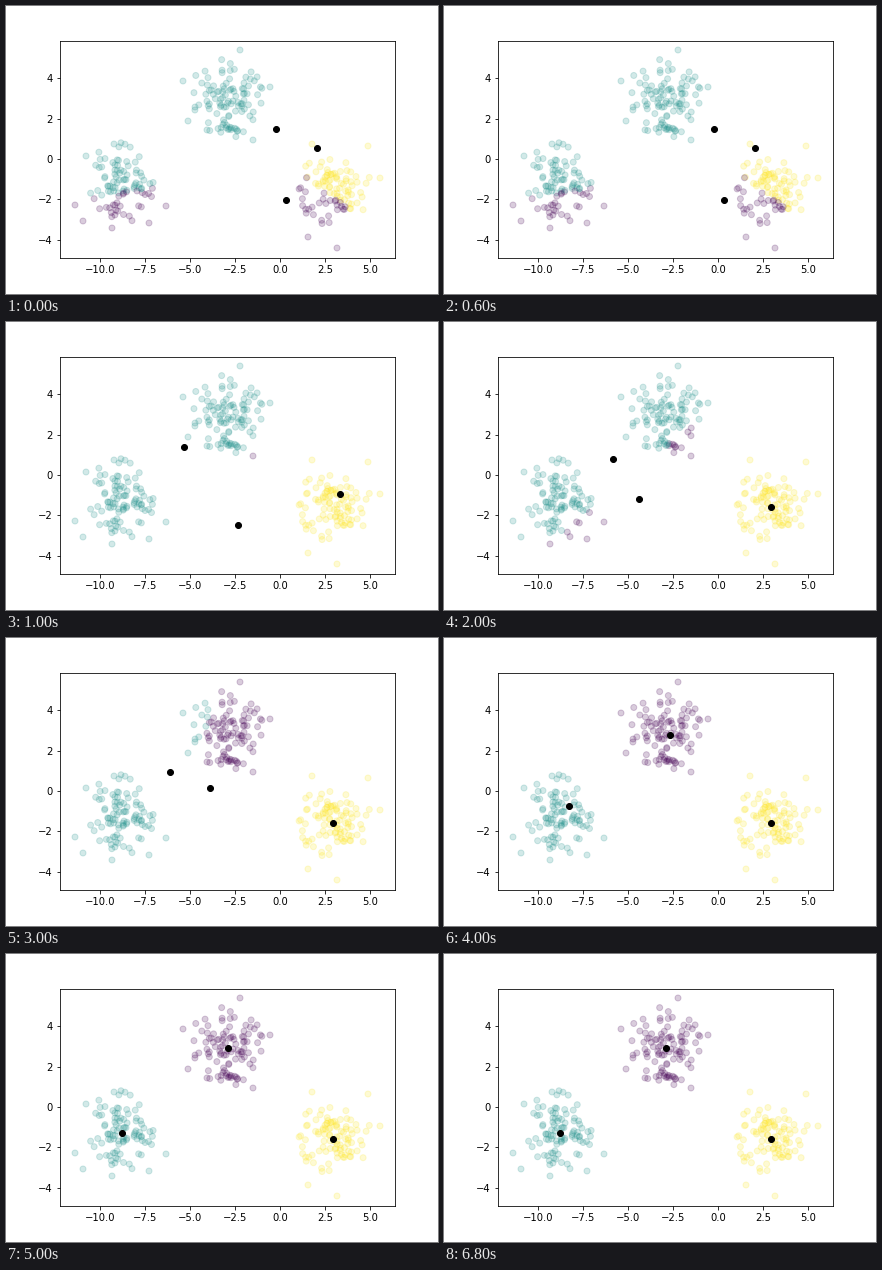
A matplotlib script that plays this animation: 432 px wide and 288 px high, repeating every 8000 ms.

```python
import numpy as np
import matplotlib.pyplot as plt
from matplotlib.animation import FuncAnimation

W, H, DPI = 432, 288, 72
COLORS = np.array(["#440154", "#21918c", "#fde725"])  # purple, teal, yellow
PER_BLOB = 100

# Axes box and data origin/scale in stage pixels (y down)
LEFT, RIGHT, TOP, BOTTOM = 54, 389.2, 34.56, 252.2
ORIGIN = np.array([274.3, 153.0])
SCALE = np.array([18.04, -20.22])


def to_data(px):
    return (np.asarray(px, float) - ORIGIN) / SCALE


# Centre of each blob and the stray points around it
BLOBS = [
    ((116, 178), [(69, 199), (77, 215), (160, 200), (143, 217), (106, 222),
                  (80, 150), (108, 138)]),
    ((222, 93), [(234, 44), (177, 75), (264, 81), (247, 134), (182, 115)]),
    ((327, 184), [(331, 242), (302, 231), (374, 172), (362, 140), (306, 138)]),
]
KNOT = (228, 124)  # tight group at the foot of the middle blob

# Path of each centroid; the last place is held
PATHS = [
    [(280, 193), (232, 202), (195, 176), (204, 149), (226, 96), (222, 93)],
    [(270, 122), (178, 124), (169, 136), (164, 133), (125, 167), (116, 178)],
    [(311, 141), (334, 171), (327, 184)],
]


def cloud(rng, n, sd=1.05, cut=2.05):
    """Centred normal cloud without far strays."""
    pts = rng.normal(0, sd, (5 * n, 2))
    pts = pts[np.hypot(*pts.T) < cut][:n]
    return pts - pts.mean(axis=0)


def make_points():
    rng = np.random.RandomState(4)
    parts = [to_data(KNOT) + cloud(rng, 8, 0.25, 0.4)]
    for home, strays in BLOBS:
        parts.append(to_data(strays))
        parts.append(to_data(home) + cloud(rng, PER_BLOB - len(strays)))
    return rng.permutation(np.vstack(parts))


def centroids(step):
    places = [path[min(step, len(path) - 1)] for path in PATHS]
    return to_data(np.array(places) + (0.5, 0.8))


def nearest(pts, centers):
    return np.linalg.norm(pts[:, None] - centers, axis=2).argmin(axis=1)


points = make_points()

plt.rcParams["font.family"] = "DejaVu Sans"
fig, ax = plt.subplots(figsize=(W / DPI, H / DPI), dpi=DPI, facecolor="white")
fig.subplots_adjust(left=LEFT / W, right=RIGHT / W,
                    bottom=1 - BOTTOM / H, top=1 - TOP / H)
dots = ax.scatter(*points.T, s=36, alpha=0.2)
marks = ax.scatter(*centroids(0).T, s=36, c="black")
(x0, y0), (x1, y1) = to_data([(LEFT, BOTTOM), (RIGHT, TOP)])
ax.set(xlim=(x0, x1), ylim=(y0, y1))


def draw(step):
    centers = centroids(step)
    dots.set_color(COLORS[nearest(points, centers)])
    marks.set_offsets(centers)
    return dots, marks


anim = FuncAnimation(fig, draw, frames=8, interval=1000,
                     init_func=lambda: draw(0), repeat=True, repeat_delay=0)
plt.show()
```
